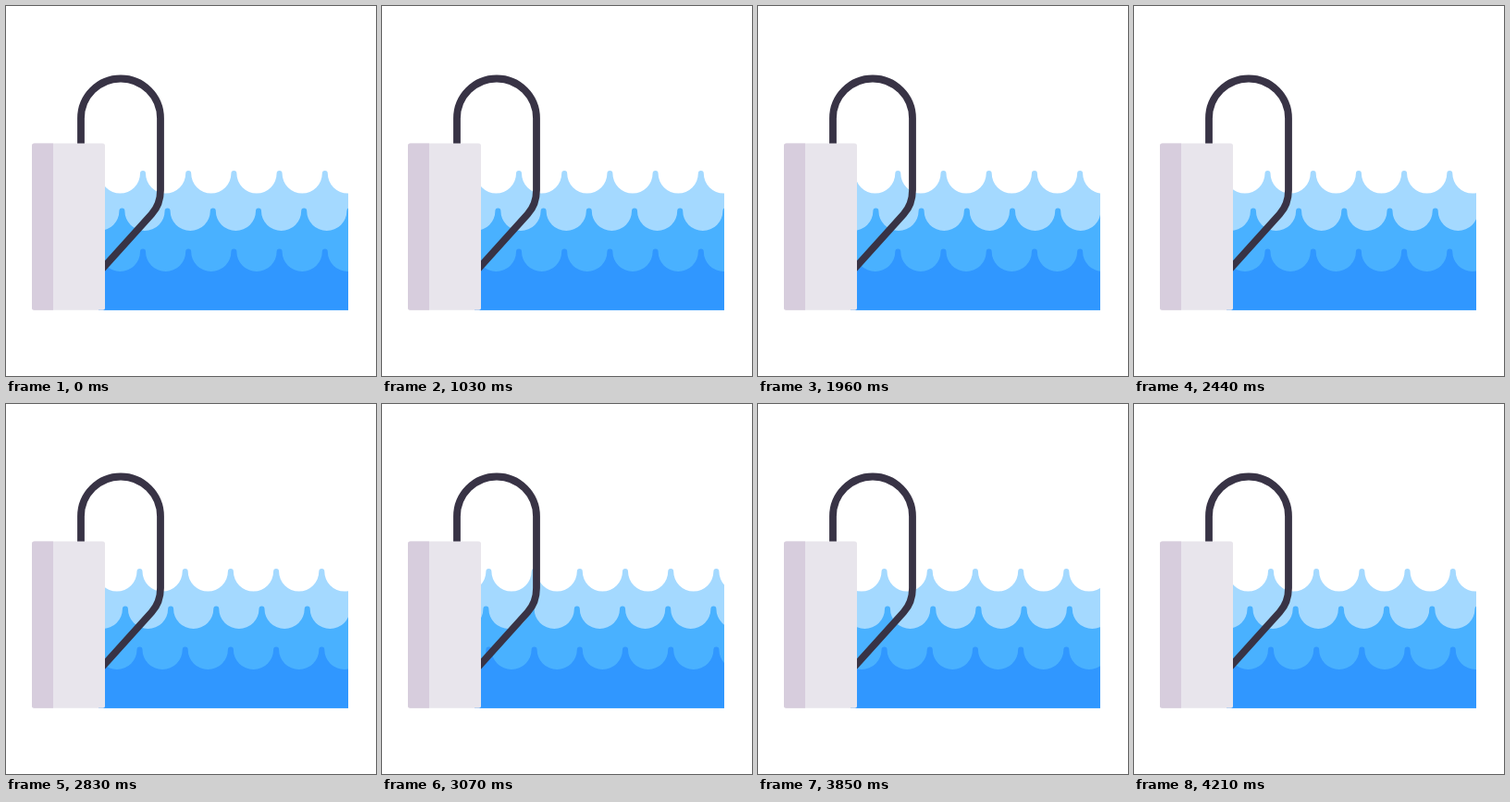
An HTML page for the animation above (4.24 s loop, 400 by 400 pixels).

```html
<!DOCTYPE html>
<html lang="en">
<head>
<meta charset="utf-8">
<title>Pool</title>
<style>
  html, body { margin: 0; width: 100%; height: 100%; overflow: hidden; background: #fff; }
  svg { display: block; width: 100%; height: 100%; }
</style>
</head>
<body>
<svg viewBox="0 0 400 400">
  <clipPath id="pool"><path d="M100 140H370V328.7H100Z"/></clipPath>
  <clipPath id="post"><rect x="28" y="148.5" width="79" height="180.3" rx="2.5"/></clipPath>
  <g clip-path="url(#pool)">
    <path id="back" fill="#a4d9ff"/>
    <path id="middle" fill="#49b1ff"/>
    <path id="front" fill="#3097ff"/>
  </g>
  <path d="M81 152V121.5A43 43 0 0 1 167 121.5V199Q167 214.5 157.5 225L102 286.5" fill="none" stroke="#383345" stroke-width="7.8"/>
  <g clip-path="url(#post)">
    <path fill="#e8e5ec" d="M28 148H107V329H28Z"/>
    <path fill="#d7cddd" d="M28 148H51V329H28Z"/>
  </g>
</svg>
<script>
  const LOOP = 4240, HOLD = 1000, STEP = 30, LAST = 108;
  const PERIOD = 49.2, TIP = 3;

  // Travel of each wave from rest to its turning point, by step count
  const steps = [0, 23, 31, 39, 47, 53.5];
  const leftward = [0, 46.2, 95.1, 131, 151.1, 156];
  const rightward = [0, 51.7, 100.4, 134.6, 151.1, 154];

  function spline(xs, ys) {
    const h = xs.slice(1).map((x, i) => x - xs[i]);
    const d = h.map((w, i) => (ys[i + 1] - ys[i]) / w);
    const m = xs.map((_, i) => i && i < h.length
      ? (d[i - 1] * h[i] + d[i] * h[i - 1]) / (h[i - 1] + h[i]) : 0);
    return x => {
      let i = 0;
      while (i < h.length - 1 && x > xs[i + 1]) i++;
      const u = (x - xs[i]) / h[i], v = 1 - u;
      return ys[i] * v * v * (1 + 2 * u) + ys[i + 1] * u * u * (3 - 2 * u)
        + h[i] * u * v * (m[i] * v - m[i + 1] * u);
    };
  }

  function wave(id, crest, y, dir, travel) {
    const el = document.getElementById(id);
    const r = PERIOD / 2 - TIP;
    const x = crest - 3 * PERIOD - TIP;
    const unit = `a${TIP} ${TIP} 0 0 1 ${2 * TIP} 0a${r} ${r} 0 0 0 ${2 * r} 0`;
    el.setAttribute("d", `M${x} ${y}${unit.repeat(9)}V340H${x}Z`);
    return { el, dir, at: spline(steps, travel) };
  }

  const waves = [
    wave("back", 148, 181, -1, leftward),
    wave("middle", 125.4, 221.4, 1, rightward),
    wave("front", 148, 265.4, -1, leftward)
  ];

  const start = performance.now();

  function draw() {
    const t = Math.max(0, performance.now() - start) % LOOP;
    const n = Math.floor((t - HOLD) / STEP);
    // Out and back along the same path
    const s = Math.max(0, Math.min(n - 1, LAST - n));
    for (const { el, dir, at } of waves) {
      el.setAttribute("transform", `translate(${(dir * at(s)) % PERIOD} 0)`);
    }
    requestAnimationFrame(draw);
  }
  draw();
</script>
</body>
</html>
```
